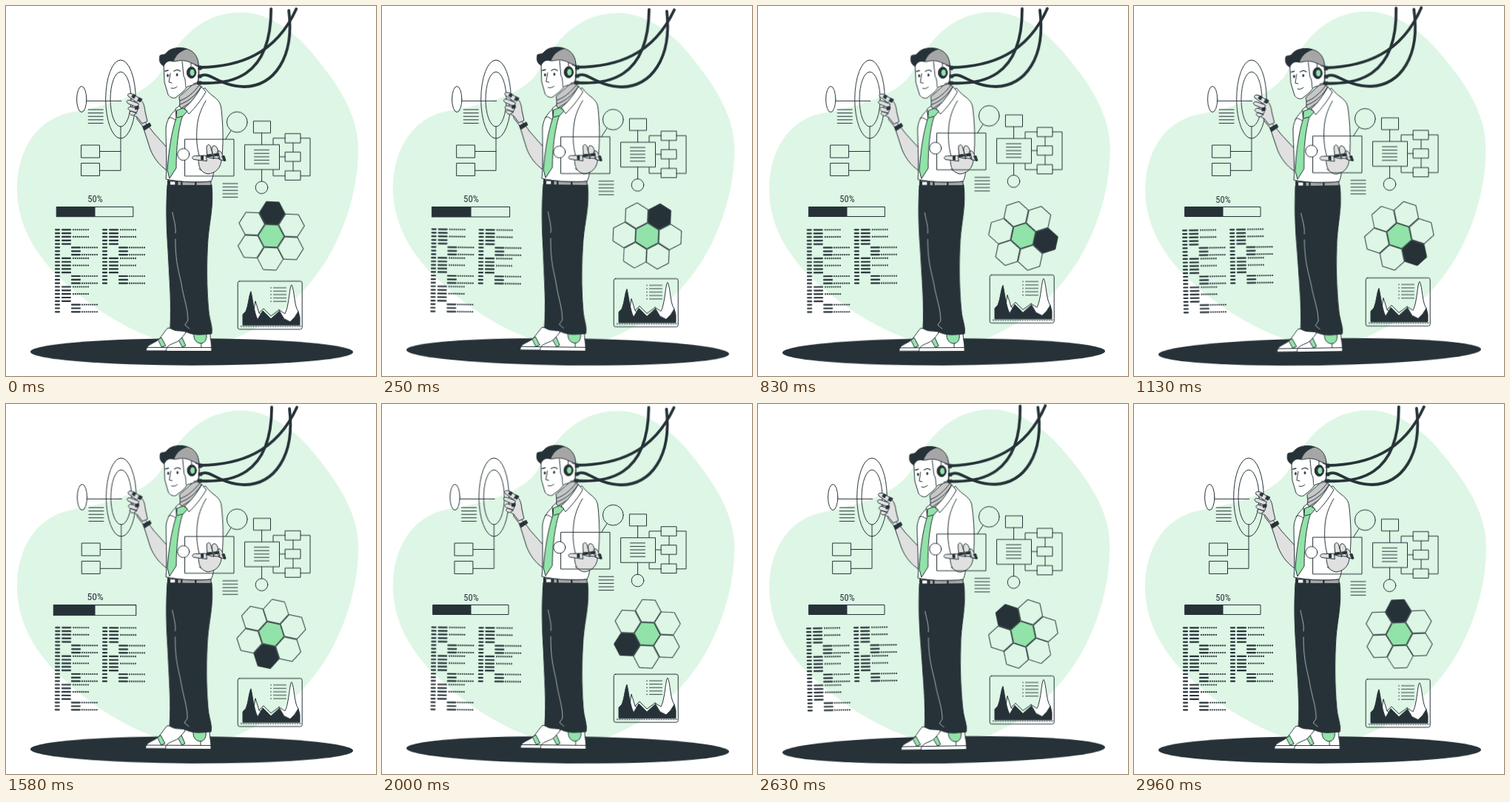
Write an HTML page without scripts that moves like this. It is 500 px wide and 500 px high and loops after 3000 ms.

```html
<!DOCTYPE html>
<html lang="en">
<head>
<meta charset="utf-8">
<title>Android at work</title>
<style>
  html, body { margin: 0; width: 100%; height: 100%; overflow: hidden; background: #fff; }
  svg { display: block; width: 100vw; height: 100vh; }
  .line { fill: none; stroke: #263238; stroke-width: 1; stroke-linejoin: round; stroke-linecap: round; }
  .dark { fill: #263238; }
  .green { fill: #92e3a9; }
  .mint { fill: #def6e5; }
  .white { fill: #fff; }
  .skin { fill: #e0e0e0; }
  .grey { fill: #a6a6a6; }
  .thick { stroke-width: 3.8; }
  .rows { stroke-width: 2.2; }
  .dots { stroke-width: 2.2; stroke-dasharray: 0 2.85; }
  .label { font: 400 12.5px "Roboto Condensed", Roboto, "Open Sans", sans-serif; font-stretch: 75%; text-anchor: middle; fill: #263238; }

  .wind, .float, .beat { animation: 1.5s linear -20ms infinite; }
  .wind { animation-name: wind; }
  .float { animation-name: float; }
  .beat { animation-name: beat; animation-timing-function: ease; transform-origin: 120px 270.5px; }
  .shake { animation: shake 3s ease -20ms infinite; }
  .spin { animation: spin 3s linear -20ms infinite; transform-origin: 358.4px 310.7px; }
  .blob { transform-origin: 245px 231px; }
  .floor { transform-origin: 251px 467.4px; }
  .man { transform-origin: 292px 235px; }
  .code { transform-origin: 126.5px 358px; }

  @keyframes wind { 25% { transform: rotate(1deg); } 75% { transform: rotate(-1deg); } }
  @keyframes float { 50% { transform: translateY(-10px); } }
  @keyframes beat {
    0%, 30%, 40%, 60%, 100% { transform: scale(1); }
    10%, 50% { transform: scale(1.1); }
  }
  @keyframes shake {
    10%, 90% { transform: translateX(-1px); }
    20%, 80% { transform: translateX(2px); }
    30%, 50%, 70% { transform: translateX(-4px); }
    40%, 60% { transform: translateX(4px); }
  }
  @keyframes spin { to { transform: rotate(360deg); } }
</style>
</head>
<body>
<svg viewBox="0 0 500 500">
  <defs>
    <path id="hex" d="M-17.3 0L-8.7 -15H8.7L17.3 0L8.7 15H-8.7Z"/>
    <path id="para" d="M0 0H20M0 4.6H20M0 9.2H20M0 13.8H20M0 18.4H20"/>
    <path id="node" d="M0 0H20.5V12.5H0Z"/>
    <g id="block">
      <path class="rows" d="M0 0h5M0 4.83h5M0 9.66h5M0 14.5h5M0 19.3h5M0 24.1h5M0 29h5M0 33.8h5
        M9 0h11M9 4.83h11M9 9.66h11M9 14.5h11M9 19.3h11M22 24.1h11M22 29h11M22 33.8h11"/>
      <path class="dots" d="M24 0h20.2M24 9.66h20.2M36 24.1h20.2M36 33.8h20.2"/>
    </g>
  </defs>

  <path class="blob wind mint" d="M317 8.5C351 8 386 32 408 57C436 90 476 138 476 193C476 248 458 302 434 342C410 381 366 430 298 453L212 453C153 435 102 397 63 358C32 324 15 287 15 247C15 197 40 152 90 143.5C150 133 195 116 211 86C231 49 261 9 317 8.5Z"/>
  <ellipse class="floor wind dark" cx="251" cy="467.4" rx="218" ry="18.3"/>

  <g class="code wind line">
    <use href="#block" x="67" y="302.3"/>
    <use href="#block" x="67" y="340.9"/>
    <use href="#block" x="67" y="379.5"/>
    <use href="#block" x="131" y="302.3"/>
    <use href="#block" x="131" y="340.9"/>
  </g>

  <g class="beat">
    <text class="label" x="120.5" y="265.5">50%</text>
    <path class="dark" d="M69 271.5H120.5V284.5H69Z"/>
    <path class="line" d="M69 271.5H171V284.5H69Z"/>
  </g>

  <g class="shake line">
    <ellipse cx="102.2" cy="126" rx="6.6" ry="17.5"/>
    <ellipse cx="155" cy="126" rx="20.3" ry="53"/>
    <ellipse cx="155" cy="126" rx="14" ry="37"/>
    <path d="M108.8 128.3H155.7M155 163V222.3H126.6M155 196.5H126.6M102 188H126.5V205H102ZM102 212.4H126.5V229.4H102Z"/>
    <use href="#para" x="111.2" y="140"/>
  </g>

  <g class="man wind line">
    <g class="thick">
      <path d="M262 83C314 82 364 66 392 4"/>
      <path d="M262 95C276 87 285 108 322 109C362 108 390 70 382 6"/>
      <path d="M261 104C300 106 358 100 358 4"/>
    </g>

    <!-- shoes and trousers -->
    <path class="white" d="M190 463C191 457 204 455 208 449C213 443 215 439 219 435L243 440V466H190Z"/>
    <path class="green" d="M206 451L210 448L216 459L211 461Z"/>
    <path class="white" d="M217 463C219 456 232 456 236 450C241 445 243 441 247 437L276 441C276 450 278 455 278 463V466.5H217Z"/>
    <path class="green" d="M234 452L238 448L243 459L239 461Z"/>
    <path class="green" d="M254 443C253 452 259 456 264 456C270 455 272 449 271 443Z"/>
    <path d="M190 461.5H217M217 461.5H278M264 456V461"/>
    <path class="dark" d="M218 242C216 275 217 300 219 330C221 370 224 405 222 435C229 441 237 438 243 440C254 446 266 444 278 443C280 434 275 424 274 412C271 380 271 345 273 315C275 290 281 270 278 242Z"/>
    <path stroke="#c4cdd0" d="M225 279C227 290 230 298 229 307M229 315C229 345 233 356 237 375C240 395 246 408 246 425L242 431L248 436" stroke-width=".8"/>

    <!-- raised arm -->
    <path class="skin" d="M178 146L186 155C190 160 195 165 199 171L217 191V222C207 215 200 206 195 194L185 163L177 153Z"/>
    <path class="skin" d="M180 126C185 128 187 134 188 143L191 156L184 159L177 150C171 148 168 143 170 137L174 128Z"/>
    <path class="skin" d="M181 125L171 119C167 117 163 119 165 122L176 130ZM179 132L169 128C164 126 161 129 165 132L177 137ZM178 139L168 136C164 137 164 140 168 142L176 144ZM176 145L169 142C165 144 167 147 171 148Z"/>
    <path class="dark" d="M172 119.5L175 121L173 125L170 123ZM180 124L184 126L181 130L178 128ZM175 136L179 135V139L175 140Z"/>
    <path class="dark" d="M185 163L194 158L196 162L187 168Z"/>

    <!-- shirt and neck -->
    <path class="white" d="M233 137C224 144 217 153 216 165C216 190 218 215 216 234C235 238 258 239 277 237C281 230 280 223 282 215L292 202C294 180 293 160 291 140C290 124 279 125 269 111Z"/>
    <path d="M270 128C263 140 259 151 258 165C257 180 258 191 261 202M229 154C225 152 222 149 219 152M261 220C264 223 271 226 277 225"/>
    <path fill="#c7c7c7" d="M234 123C235 130 235 134 234 139L241 144C247 134 256 126 265 112L258 101L247 111Z"/>
    <path d="M235 128C244 125 254 117 261 107M235 133C244 130 256 122 263 110M236 139C243 134 250 131 257 122"/>
    <path class="white" d="M264 109L270 116C264 127 255 138 247 146L241 138C249 132 258 120 264 109ZM234 135L229 139L230 151L237 140Z"/>
    <path class="green" d="M231 141L239 138L245 142L238 150C233 166 230 190 230 219L221 233L218 222C220 196 223 173 230 151Z"/>
    <path d="M231 151L238 149"/>
    <path class="grey" d="M219 235.5C239 238 259 239 277 237V242.5H219Z"/>
    <path class="white" d="M222 237H229V242H222Z"/>
    <path class="dark" d="M229.5 237H232V242.5H229.5ZM237 237.5H238V242.5H237ZM256 238H257V242.5H256ZM219 236.5H220.5V242H219Z"/>

    <!-- head -->
    <path class="white" d="M213 78L214 103L219 120C222 124 226 125 229 124L239 116L245 109L258 105C262 93 261 82 259 75L229 65Z"/>
    <path class="grey" d="M225 74C225 62 235 57 244 58C255 61 260 70 260 81L250 77C243 73 236 73 228 75Z"/>
    <path class="dark" d="M213 81C208 79 206 73 208 67C211 65 214 67 217 63C222 56 237 55 244 58C235 61 229 66 226 75C220 73 216 75 213 81Z"/>
    <path d="M238 75L240 95C243 98 242 106 243 110M250 77V82M255 80L260 82V103L253 105M222 91L220 103L224 104M223 111C226 112 229 111 231 109"/>
    <path d="M215 88L219 87M227 88C230 86 233 86 235 88" stroke-width="1.4"/>
    <ellipse class="dark" cx="218.5" cy="94" rx=".8" ry="1.8"/>
    <ellipse class="dark" cx="231" cy="93" rx=".8" ry="1.8"/>
    <path class="dark" d="M260 81H264V86H260ZM260 93H264V97H260ZM259 102H264V106H259Z"/>
    <ellipse class="dark" cx="250.5" cy="90" rx="6.2" ry="7.6"/>
    <ellipse class="green" cx="251.5" cy="90" rx="3.6" ry="4.8"/>

    <!-- open hand -->
    <path class="skin" d="M260 207C260 218 263 225 273 227C283 226 290 219 291 209L286 203H269Z"/>
    <path class="skin" d="M270 202L258 202.5C251 202 250 206 254 207.5L271 209.5ZM272 204L271 192C271 186 276 186 277 192L281 206ZM280 205L278 194C278 187 284 187 286 194L289 206ZM288 207L285 199C286 194 290 195 292 200L296 209Z"/>
    <path class="dark" d="M264 202.5H266.5V208L264 207.5ZM272 201L278 200.5L278.5 203L272 204ZM281 200L287 199.5L287.5 202L281.5 203ZM292 203L295 202.5L297 209L294.5 209Z"/>
  </g>

  <g class="float line">
    <path d="M242 180.3H308V230H242ZM304 168.7L296.5 180.3"/>
    <circle cx="312.3" cy="157.1" r="13.9"/>
    <circle class="white" cx="239.8" cy="200.8" r="8"/>
    <path d="M377.5 178.8H361V229.8H377.5M369.5 204H377.5M388 185.3V197.7M388 210.3V223M398 178.8H411V229.8H398"/>
    <path class="mint" d="M323 187.7H369.5V221.2H323Z"/>
    <path d="M334.8 155.8H357.5V171.8H334.8ZM345.6 171.8V187.7M345.6 221.2V237.3"/>
    <circle cx="345.5" cy="245.5" r="8.3"/>
    <use href="#para" x="335.5" y="194.8"/>
    <use href="#para" x="293" y="240.2"/>
    <use href="#node" x="377.5" y="172.7"/>
    <use href="#node" x="377.5" y="197.7"/>
    <use href="#node" x="377.5" y="223"/>
  </g>

  <g class="spin">
    <g class="line" transform="translate(358.4 310.7)">
      <use href="#hex" class="green"/>
      <use href="#hex" class="dark" y="-31"/>
      <use href="#hex" y="-31" transform="rotate(60)"/>
      <use href="#hex" y="-31" transform="rotate(120)"/>
      <use href="#hex" y="-31" transform="rotate(180)"/>
      <use href="#hex" y="-31" transform="rotate(240)"/>
      <use href="#hex" y="-31" transform="rotate(300)"/>
    </g>
  </g>

  <g class="float line">
    <rect x="313.2" y="372.1" width="87" height="65" rx="2.5"/>
    <path class="white" d="M331 429L335 412L337 399L342 415L347 419L340 429Z"/>
    <path class="dark" d="M320 431V417L324 413C328 403 328 392 331 386C333 394 335 414 340 424L347 412L358 423L369 413L376 424L384 420L390 422L395 413L397 421V431Z"/>
    <path class="white" d="M369 411L377 416C383 404 383 378 386 377C390 384 389 405 395 413L390 421L384 427L376 423Z"/>
    <path d="M342 415L348 409L358 419L369 411"/>
    <path d="M317 432.8H399" stroke-width=".6"/>
    <path d="M318 433.6H399" stroke-dasharray=".3 3" stroke-width=".9"/>
    <use href="#para" transform="translate(361.5 381) scale(.85 1)"/>
    <path d="M357.5 381h1M357.5 385.6h1M357.5 390.2h1M357.5 394.8h1M357.5 399.4h1"/>
  </g>
</svg>
</body>
</html>
```
